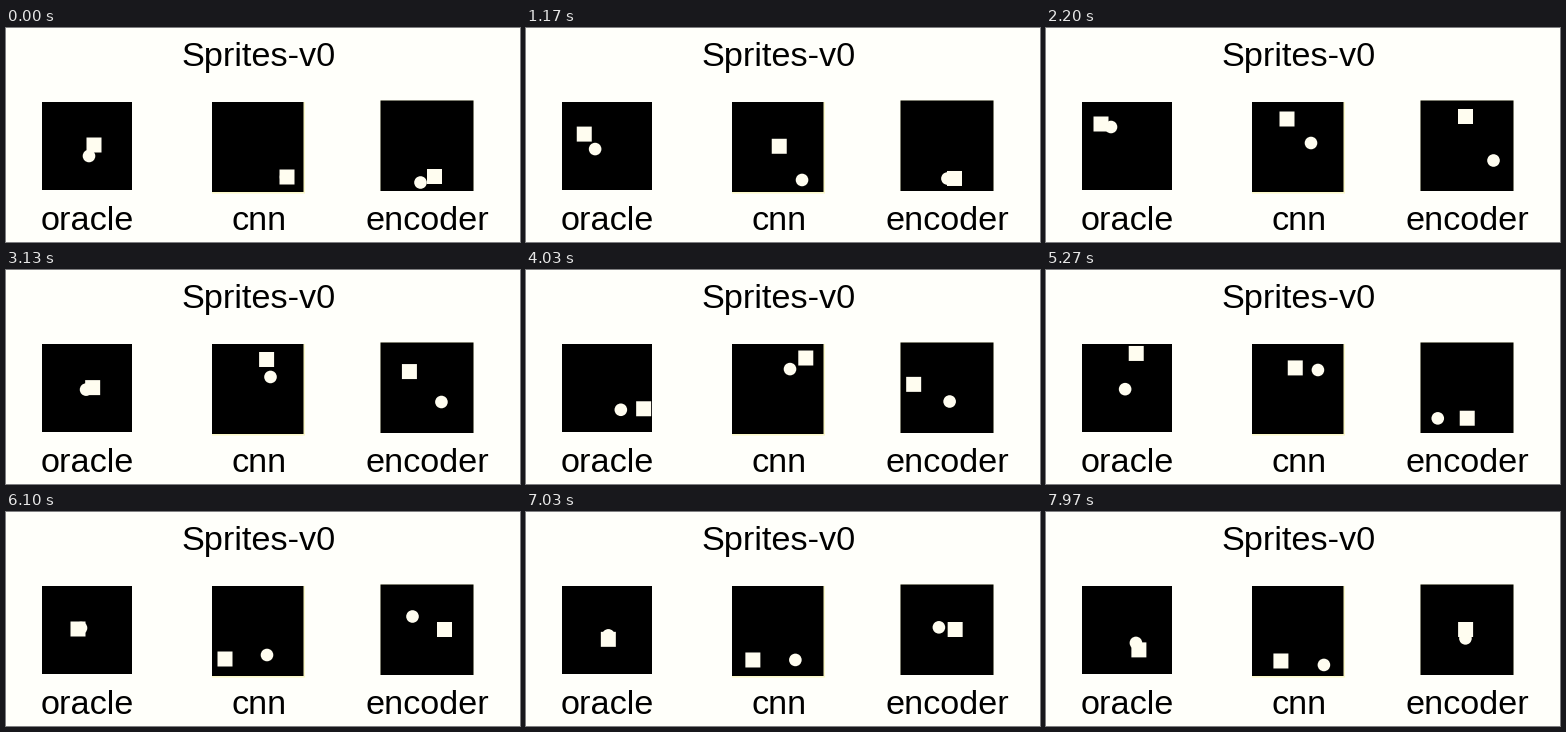
Recreate the animation shown at these times as a matplotlib script. Size 514 by 214 pixels, loop 8 s.

```python
import numpy as np
import matplotlib.pyplot as plt
from matplotlib.animation import FuncAnimation
from matplotlib.patches import Circle, Rectangle

W, H, DPI = 514, 214, 64
LOOP, STEP = 8000, 20
PAPER, INK, SPRITE, EDGE = "#fffffa", "#000000", "#fffdf0", "#fbf8c8"
SIDE, RADIUS, TEXT = 15, 6.3, 34.3

# Sprites glide in straight lines between these moments (seconds).
TURNS = [0, 1.17, 2.2, 4.03, 5.27, 6.1, 7.97]

fig = plt.figure(figsize=(W / DPI, H / DPI), dpi=DPI, facecolor=PAPER)
ax = fig.add_axes([0, 0, 1, 1])
ax.set_xlim(0, W)
ax.set_ylim(H, 0)
ax.axis("off")


def write(x, baseline, text):
    ax.text(x, baseline, text, family="Liberation Sans", color=INK,
            fontsize=TEXT * 72 / DPI, ha="center", va="baseline")


def box(x, y, w, h, color):
    return ax.add_patch(Rectangle((x, y), w, h, facecolor=color,
                                  linewidth=0, snap=False))


class Panel:
    """A labelled room; sprite paths are measured from its top left corner."""

    def __init__(self, label, centre, x, y, w, h, square_path, disc_path, rim=0):
        write(centre, 202, label)
        box(x, y, w + rim, h + rim, EDGE)
        room = box(x, y, w, h, INK)
        self.square = box(0, 0, SIDE, SIDE, SPRITE)
        self.disc = ax.add_patch(Circle((0, 0), RADIUS, facecolor=SPRITE,
                                        linewidth=0))
        for shape in (self.square, self.disc):
            shape.set_clip_path(room)
        self.square_path = np.array(square_path) + (x, y)
        self.disc_path = np.array(disc_path) + (x, y)

    def move(self, t):
        x, y = glide(self.square_path, t)
        self.square.set_xy((x - SIDE / 2, y - SIDE / 2))
        self.disc.center = glide(self.disc_path, t)
        return [self.square, self.disc]


def glide(path, t):
    return [np.interp(t, TURNS, axis) for axis in path.T]


write(253, 38, "Sprites-v0")
panels = [
    Panel("oracle", 81, 36, 74, 90, 88,
          [(52, 43), (22, 32), (19, 22), (82, 65), (54, 9), (36, 43), (57, 64)],
          [(47, 54), (33, 47), (29, 25), (59, 66), (43, 45), (39, 42), (54, 57)]),
    Panel("cnn", 253, 206, 74, 91.5, 90,
          [(75, 75), (47, 44), (35, 17), (74, 14), (43, 24), (13, 73), (29, 75)],
          [(74, 75), (70, 78), (59, 41), (58, 25), (66, 26), (55, 69), (72, 79)],
          rim=1.5),
    Panel("encoder", 421, 374.5, 72.5, 93, 90.5,
          [(54, 76), (54, 78), (45, 16), (13, 42), (47, 76), (64, 45), (45, 45)],
          [(40, 82), (47, 78), (73, 60), (49, 59), (17, 76), (32, 32), (45, 54)]),
]


def draw(frame):
    t = frame * STEP / 1000
    return [shape for panel in panels for shape in panel.move(t)]


anim = FuncAnimation(fig, draw, frames=LOOP // STEP, interval=STEP,
                     init_func=lambda: draw(0), repeat=True, repeat_delay=0)
plt.show()
```
